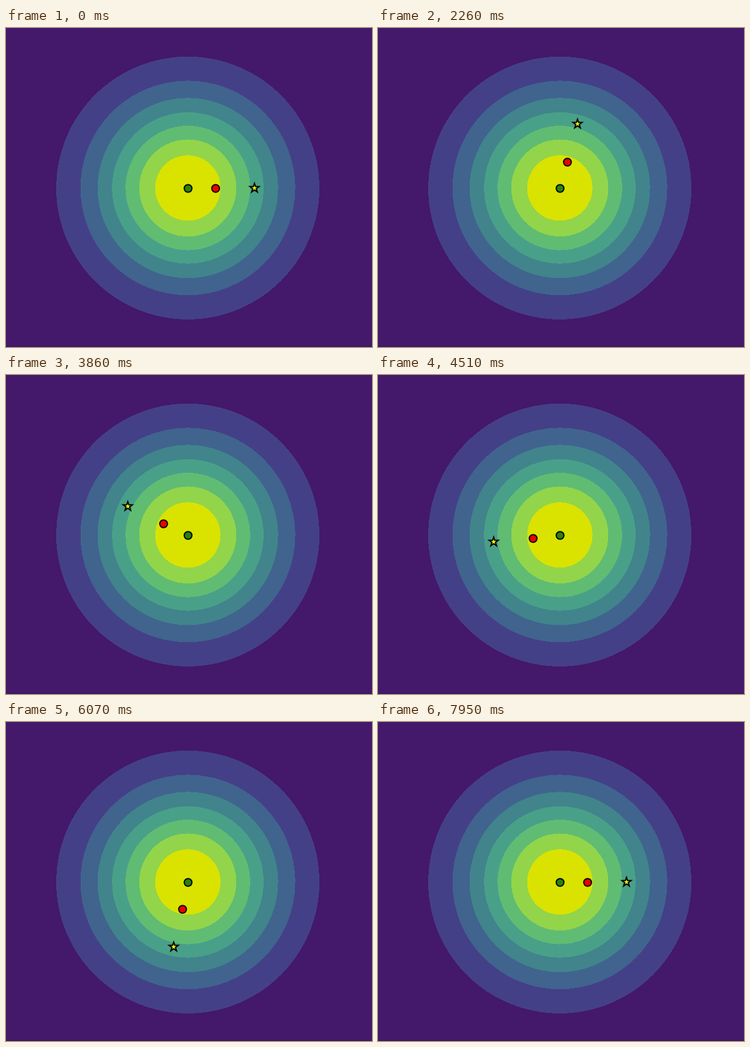
Recreate the animation shown at these times as an HTML page. Size 598 by 522 pixels, loop 8750 ms.

```html
<!DOCTYPE html>
<html lang="en">
<head>
<meta charset="utf-8">
<title>Orbit over a Gaussian</title>
<style>
  html, body { margin: 0; width: 100%; height: 100%; overflow: hidden; background: #44186a; }
  svg { display: block; }
  .mark { stroke: #000; stroke-width: 2; }
</style>
</head>
<body>
<svg width="598" height="522" viewBox="0 0 598 522">
  <rect width="598" height="522" fill="#44186a"/>
  <rect y="521" width="598" height="1" fill="#3a1459"/>
  <g id="rings" shape-rendering="crispEdges"></g>
  <circle class="mark" cx="297.5" cy="262.5" r="6.3" fill="#2b8306"/>
  <circle class="mark" id="dot" r="6.3" fill="#ee0000"/>
  <path class="mark" id="star" fill="#ffff00"/>
</svg>
<script>
const LOOP = 8750;
const POSE = 110;   // ms each pose is held
const NOTCH = 0.05; // radians per slider notch
const $ = id => document.getElementById(id);

// Contours of a 2D normal density at multiples of 0.02
const SIGMA = 105.6;
const colors = ['#444087', '#40648e', '#41848c', '#49a089', '#60bc73', '#92d54a', '#dae200'];
colors.forEach((fill, i) => {
  const level = 0.02 * (i + 1) * 2 * Math.PI;
  const ring = document.createElementNS('http://www.w3.org/2000/svg', 'circle');
  const attrs = { cx: 297.1, cy: 261.8, r: SIGMA * Math.sqrt(-2 * Math.log(level)), fill };
  for (const key in attrs) ring.setAttribute(key, attrs[key]);
  $('rings').append(ring);
});

const points = Array.from({ length: 10 }, (_, i) => {
  const r = i % 2 ? 7.8 * 0.382 : 7.8;
  const a = i * Math.PI / 5;
  return `${(r * Math.sin(a)).toFixed(2)},${(-r * Math.cos(a)).toFixed(2)}`;
});
$('star').setAttribute('d', `M${points.join('L')}Z`);

// Uneven hand drag of the slider: [pose, notch]
const drag = [[0, 0], [10, 15], [20, 26], [27, 37], [35, 54], [46, 75], [56, 92], [59, 102], [64, 109], [72, 126]];

function angleAt(time) {
  const pose = Math.floor(time / POSE);
  const next = drag.findIndex(([p]) => p > pose);
  if (next < 0) return 2 * Math.PI;
  const [p0, n0] = drag[next - 1], [p1, n1] = drag[next];
  return NOTCH * Math.round(n0 + (n1 - n0) * (pose - p0) / (p1 - p0));
}

const place = (id, x, y) => $(id).setAttribute('transform', `translate(${x} ${y})`);

// Markers sit on whole pixels
function draw(time) {
  const angle = angleAt(time);
  const cos = Math.cos(angle), sin = Math.sin(angle);
  place('dot', Math.floor(297.5 + 44.7 * cos) + 0.5, Math.floor(262.4 - 44.7 * sin) + 0.5);
  place('star', Math.floor(297.5 + 108.6 * cos), Math.floor(262.1 - 108.6 * sin));
}

let origin;
function tick(now) {
  origin ??= now;
  draw((now - origin) % LOOP);
  requestAnimationFrame(tick);
}
draw(0);
requestAnimationFrame(tick);
</script>
</body>
</html>
```
